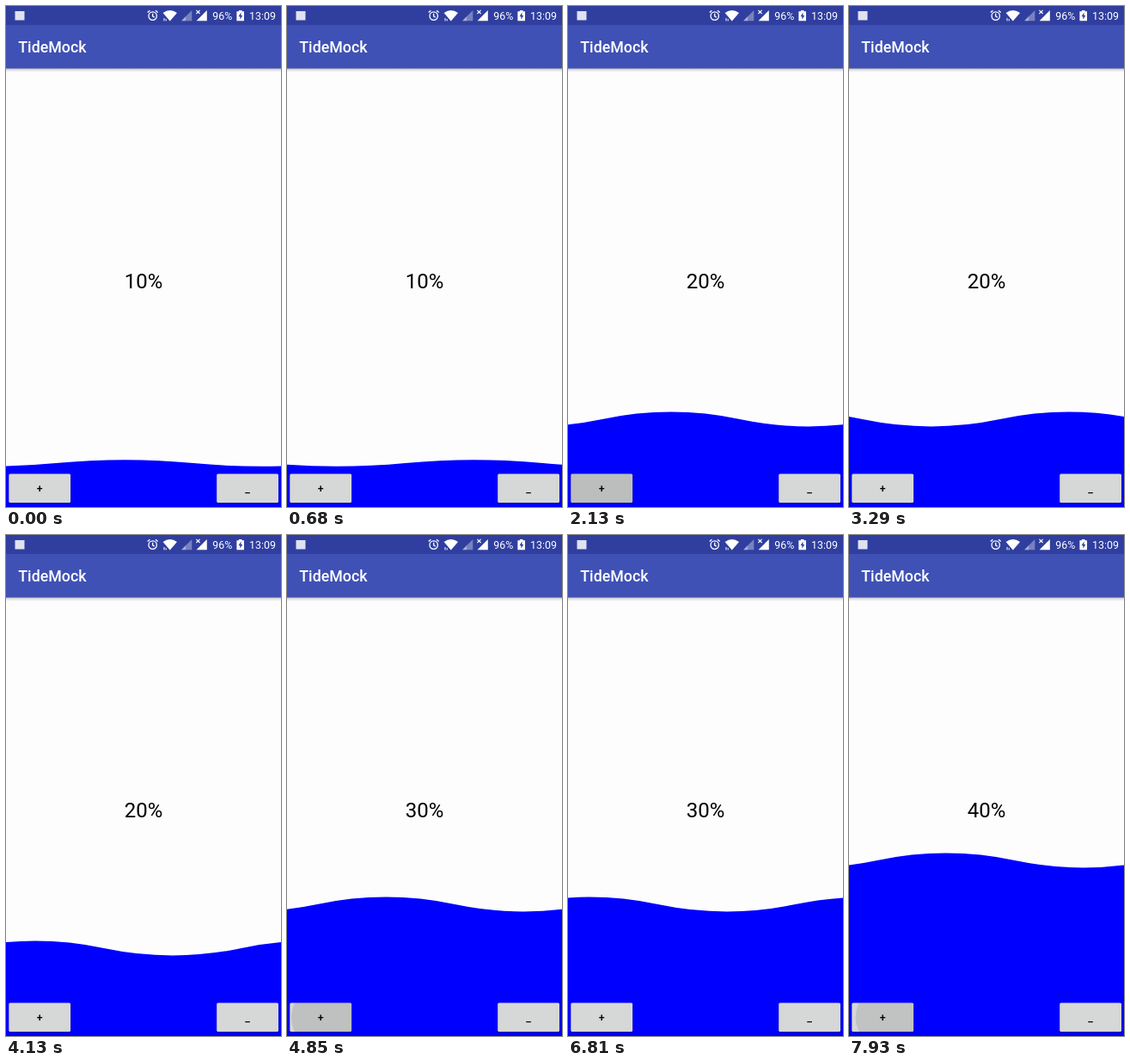
An HTML page for the animation above (8000 ms loop, 320 px wide and 582 px high).

```html
<!DOCTYPE html>
<html lang="en">
<head>
<meta charset="utf-8">
<title>Wave level</title>
<style>
html, body { margin: 0; width: 100%; height: 100%; overflow: hidden; background: #fefdfe; }
svg { display: block; width: 100%; height: 100%; font-family: Roboto, sans-serif; }
.medium { font-weight: 500; }
</style>
</head>
<body>
<svg viewBox="0 0 320 582">
  <defs>
    <linearGradient id="shade" x1="0" y1="0" x2="0" y2="1">
      <stop offset="0" stop-color="#000" stop-opacity=".38"/>
      <stop offset=".35" stop-color="#000" stop-opacity=".14"/>
      <stop offset="1" stop-color="#000" stop-opacity="0"/>
    </linearGradient>
    <clipPath id="plusClip"><rect x="3.3" y="543.5" width="71.8" height="33.6" rx="1.5"/></clipPath>
  </defs>

  <rect width="320" height="582" fill="#fefdfe"/>
  <path id="wave" fill="#00f"/>
  <text id="label" x="160" y="327.5" font-size="24" text-anchor="middle"></text>

  <rect y="72" width="320" height="5" fill="url(#shade)"/>
  <rect width="320" height="72.5" fill="#3f51b5"/>
  <rect width="320" height="22" fill="#303f9f"/>
  <text class="medium" x="14.3" y="54.2" font-size="17.8" fill="#fff">TideMock</text>

  <rect x="10.5" y="6" width="11" height="10.5" fill="#dfe2f0"/>
  <g fill="none" stroke="#fff" stroke-width="1.3">
    <circle cx="170.7" cy="11.6" r="4.7"/>
    <path d="M170.7 8.8v3.1l2.1 1.3M164.7 7.6l2.7-2.4M176.7 7.6l-2.7-2.4"/>
  </g>
  <path d="M182.6 8.1Q190.8 2.1 199 8.1L190.8 17.6Z" fill="#fff"/>
  <path d="M184 14v3.4M186.2 15.2v2.2" stroke="#fff" stroke-width="1"/>
  <path d="M216.3 5v12.2h-12.2z" fill="#fff" opacity=".35"/>
  <path d="M209.2 12.1v5.1h-5.1z" fill="#fff" opacity=".35"/>
  <path d="M233.8 5v12.2h-12.2z" fill="#fff"/>
  <path d="M221.4 4.8l4.2 4.2M225.6 4.8l-4.2 4.2" stroke="#fff" stroke-width="1.1"/>
  <path d="M268.4 6.3h2.5v-1.4h3.6v1.4h2.5v11h-8.6z" fill="#fff"/>
  <path d="M273.5 7.6l-3 4.7h1.9v3.5l2.9-4.8h-1.8z" fill="#303f9f"/>
  <g font-size="12.4" fill="#fff">
    <text x="240.3" y="16">96%</text>
    <text x="283" y="16">13:09</text>
  </g>

  <g id="buttons">
    <g fill="#000" opacity=".3">
      <rect x="2.8" y="544" width="72.8" height="34.3" rx="2"/>
      <rect x="244.7" y="544" width="72.8" height="34.3" rx="2"/>
    </g>
    <g fill="#d6d7d7">
      <rect x="3.3" y="543.5" width="71.8" height="33.6" rx="1.5"/>
      <rect x="245.2" y="543.5" width="71.8" height="33.6" rx="1.5"/>
    </g>
    <circle id="ripple" clip-path="url(#plusClip)" cy="560.3"/>
    <g class="medium" font-size="12.4" text-anchor="middle">
      <text x="39.2" y="565.2">+</text>
      <text x="281.1" y="565.2">_</text>
    </g>
  </g>
</svg>
<script>
const LOOP = 8000, SPEED = 0.117, WIDTH = 320, FLOOR = 582, RANGE = 510;
const $ = id => document.getElementById(id);
const clamp = v => Math.max(0, Math.min(1, v));
const mix = (a, b, k) => a + (b - a) * k;

// Every tap restarts the wave with its crest at x = 80.
const phases = [
  { at: 0, percent: 10, crest: 138, amp: 3.8 },
  { at: 1790, percent: 20, crest: 80, amp: 8.4 },
  { at: 4550, percent: 30, crest: 80, amp: 8.4 },
  { at: 7650, percent: 40, crest: 80, amp: 8.4 }
];

function drawWave(phase, age) {
  const crest = (phase.crest + age * SPEED) % WIDTH;
  const level = FLOOR - RANGE * phase.percent / 100;
  const start = crest - 80 - WIDTH;
  $("wave").setAttribute("d",
    `M${start} ${level}q80 ${-2 * phase.amp} 160 0` + "t160 0".repeat(5) + `V${FLOOR}H${start}Z`);
}

function drawRipple(age, tapped) {
  const grow = clamp(age / 340);
  const fade = 1 - clamp((age - 380) / 260);
  const ripple = $("ripple");
  ripple.setAttribute("cx", mix(52, 42, grow));
  ripple.setAttribute("r", mix(8, 42, grow));
  ripple.setAttribute("opacity", tapped ? 0.12 * clamp(age / 340) * fade : 0);
}

function render(t) {
  const phase = phases.filter(p => p.at <= t).pop();
  const age = t - phase.at;
  drawWave(phase, age);
  drawRipple(age, phase.at > 0);
  $("label").textContent = phase.percent + "%";
}

const begin = performance.now();
function tick() {
  render((performance.now() - begin) % LOOP);
  requestAnimationFrame(tick);
}
tick();
</script>
</body>
</html>
```
